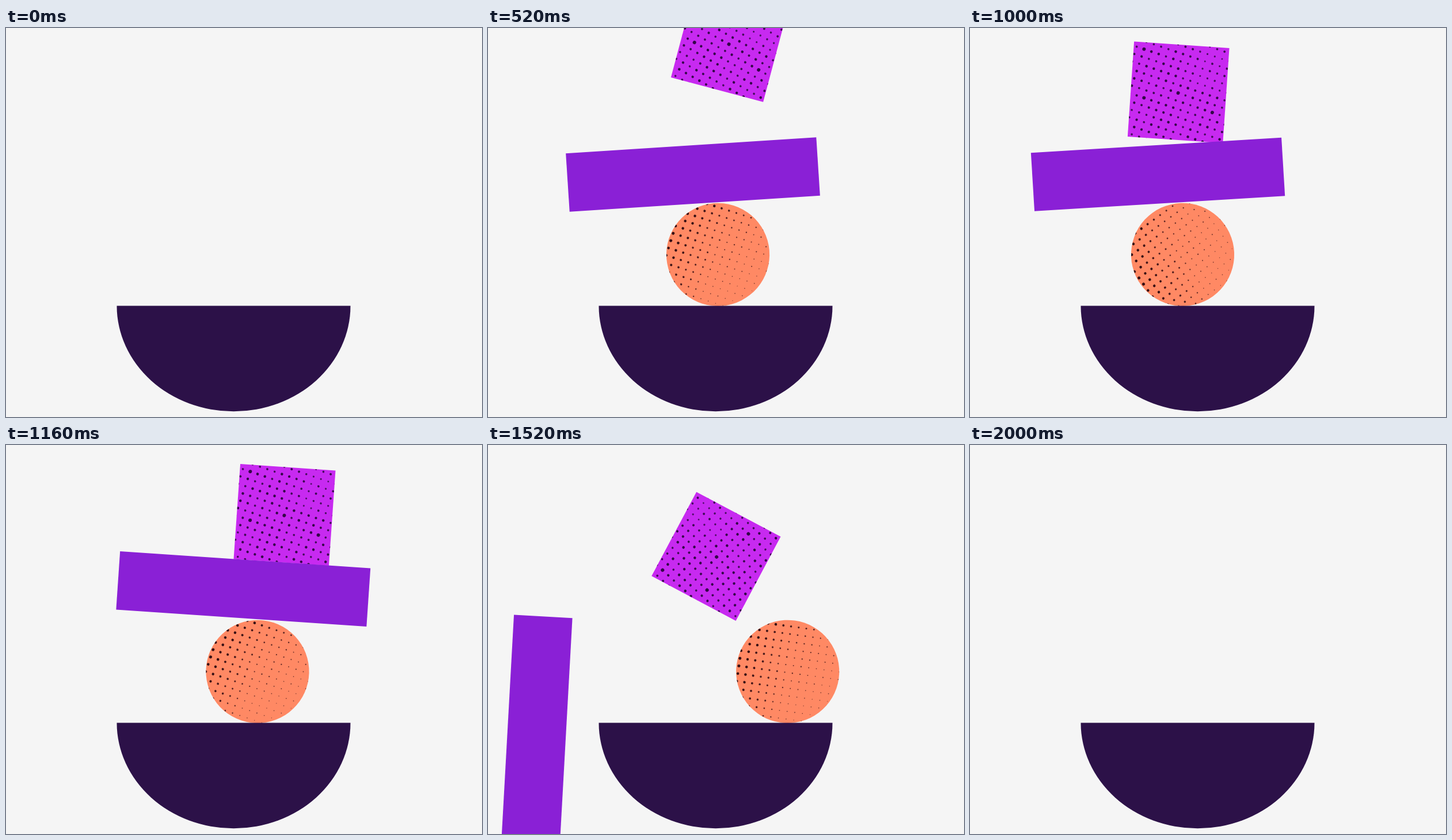
An HTML page with a canvas that plays this animation: 827x677 px, repeating every 2.04 s.

```html
<!DOCTYPE html>
<html lang="en">
<head>
<meta charset="utf-8">
<title>Balancing shapes</title>
<style>
  html, body { margin: 0; width: 100%; height: 100%; overflow: hidden; background: #f5f5f5; }
  canvas { display: block; }
</style>
</head>
<body>
<canvas id="stage" width="827" height="677"></canvas>
<script>
const ctx = document.getElementById('stage').getContext('2d');
const LOOP = 2040, STEP = 40, RAD = Math.PI / 180, PITCH = 13.4;
const BALL_R = 89.6, BALL_Y = 394.3, SIDE = 165.8, BAR_W = 436, BAR_H = 101.7;
const BALL_LAND = 240, BAR_LAND = 360, BALL_OFF = 1600;

// Turning points of the ball along the bowl: time, x, angle
const roll = [
  [BALL_LAND, 440, 60], [520, 399.5, 17.7], [840, 302, -90.3], [1160, 437, 18.5],
  [1360, 420.5, -9], [1680, 691.5, 37.3], [1960, 950, 86]
];
// Tilt of the bar while it rides on the ball: time, angle
const tilt = [[BAR_LAND, 4], [520, -3.7], [840, -10.85], [1160, 3.88]];
// The bar sliding off: time, x, y, angle
const slide = [
  [1160, 412.3, 250.5, 3.88], [1260, 290, 272, -14], [1360, 193.7, 359.3, -62.6],
  [1680, -15, 710, -104.8], [1800, -90, 960, -120]
];
// The square dropping in, riding and tumbling off: time, x, y, angle
const tumble = [
  [400, 445, -125, 21], [520, 419.3, 27.2, 14.9], [640, 363, 101, 9],
  [840, 240.4, 101.8, 3.8], [1160, 484, 121.5, 4], [1280, 467, 108, -14],
  [1360, 448, 128, -28], [1680, 323.3, 299.5, -106.1], [1960, 40, 840, -250]
];

// Tangent that never overshoots the neighbouring keys
function tangent(keys, i, c) {
  if (i === 0 || i === keys.length - 1) return 0;
  const [a, b, d] = [keys[i - 1], keys[i], keys[i + 1]];
  const before = (b[c] - a[c]) / (b[0] - a[0]);
  const after = (d[c] - b[c]) / (d[0] - b[0]);
  return before * after <= 0 ? 0 : 2 * before * after / (before + after);
}

function spline(keys, t) {
  const last = keys[keys.length - 1];
  if (t <= keys[0][0]) return keys[0].slice(1);
  if (t >= last[0]) return last.slice(1);
  const i = keys.findIndex(k => k[0] >= t) - 1;
  const a = keys[i], b = keys[i + 1], span = b[0] - a[0];
  const u = (t - a[0]) / span, v = 1 - u;
  return a.slice(1).map((from, k) =>
    v * v * (1 + 2 * u) * from + u * u * (3 - 2 * u) * b[k + 1] +
    u * v * span * (v * tangent(keys, i, k + 1) - u * tangent(keys, i + 1, k + 1)));
}

// Height above the resting place during the fall that ends at time land
function dropHeight(t, land) {
  const p = Math.min(1, Math.max(0, 1 - (land - t) / 200));
  return 500 * (1 - p ** 1.5);
}

function ballPose(t) {
  const [x, angle] = spline(roll, t);
  const fall = 0.0045 * Math.max(0, t - BALL_OFF) ** 2;
  return [x, BALL_Y - dropHeight(t, BALL_LAND) + fall, angle];
}

function barPose(t) {
  if (t > 1160) return spline(slide, t);
  const [x] = spline(roll, Math.max(t, BAR_LAND));
  const [angle] = spline(tilt, t);
  const c = Math.cos(angle * RAD), s = Math.sin(angle * RAD);
  const lift = 141.8, shift = -34.4;
  return [
    x + lift * s + shift * c,
    BALL_Y - lift * c + shift * s - dropHeight(t, BAR_LAND),
    angle
  ];
}

const squarePose = t => spline(tumble, t);

function noise(i, j) {
  const n = Math.sin(i * 127.1 + j * 311.7) * 43758.5453;
  return n - Math.floor(n);
}

// Ball dots: heavy on the left, fading to the lower right
const ballDots = [];
for (let i = 0; i < 14; i++) {
  for (let j = 0; j < 13; j++) {
    const x = -85.3 + PITCH * i, y = -78.6 + PITCH * j;
    const r = 1.15 - x * (x < 0 ? 0.015 : 0.004) - y * 0.003 +
      (j === 0 ? 0.3 : 0) + (noise(i, j) - 0.5) * 0.3;
    ballDots.push([x, y, r]);
  }
}

// Square dots: an even field, lighter in one corner, with a few heavy ones
const heavy = new Set(['0,0', '-4,6', '2,4', '1,-5']);
const squareDots = [];
for (let i = -9; i <= 9; i++) {
  for (let j = -9; j <= 9; j++) {
    const light = i < -1 && j < -1 ? 0.35 : 0;
    const r = heavy.has(i + ',' + j) ? 3 : 1.75 + noise(i, j) * 0.6 - light;
    squareDots.push([i * PITCH, j * PITCH, r]);
  }
}

function drawDots(dots, color) {
  ctx.fillStyle = color;
  for (const [x, y, r] of dots) {
    ctx.globalAlpha = Math.min(0.95, 0.4 + r * 0.25);
    ctx.beginPath();
    ctx.arc(x, y, r, 0, 2 * Math.PI);
    ctx.fill();
  }
}

function place([x, y, angle], draw) {
  ctx.save();
  ctx.translate(x, y);
  ctx.rotate(angle * RAD);
  draw();
  ctx.restore();
}

function fillShape(color, trace) {
  ctx.fillStyle = color;
  ctx.beginPath();
  trace();
  ctx.fill();
}

function drawSquare() {
  fillShape('#c72af0', () => ctx.rect(-SIDE / 2, -SIDE / 2, SIDE, SIDE));
  ctx.clip();
  ctx.translate(-0.5, 1.2);
  ctx.rotate(104.6 * RAD);
  drawDots(squareDots, '#2c0640');
}

function drawBar() {
  fillShape('#8a20d6', () => ctx.rect(-BAR_W / 2, -BAR_H / 2, BAR_W, BAR_H));
}

function drawBall() {
  fillShape('#ff8964', () => ctx.arc(0, 0, BALL_R, 0, 2 * Math.PI));
  ctx.clip();
  drawDots(ballDots, '#2e0a10');
}

function render(now) {
  let t = Math.floor((now % LOOP) / STEP) * STEP;
  if (t >= 1720) t -= STEP; // one pose is held for two steps
  ctx.fillStyle = '#f5f5f5';
  ctx.fillRect(0, 0, 827, 677);
  place(squarePose(t), drawSquare);
  place(barPose(t), drawBar);
  place(ballPose(t), drawBall);
  fillShape('#2c1148', () => ctx.ellipse(395.5, 483.5, 203, 183.7, 0, 0, Math.PI));
}

let start = null;
function tick(now) {
  if (start === null) start = now;
  render(now - start);
  requestAnimationFrame(tick);
}
render(0);
requestAnimationFrame(tick);
</script>
</body>
</html>
```
